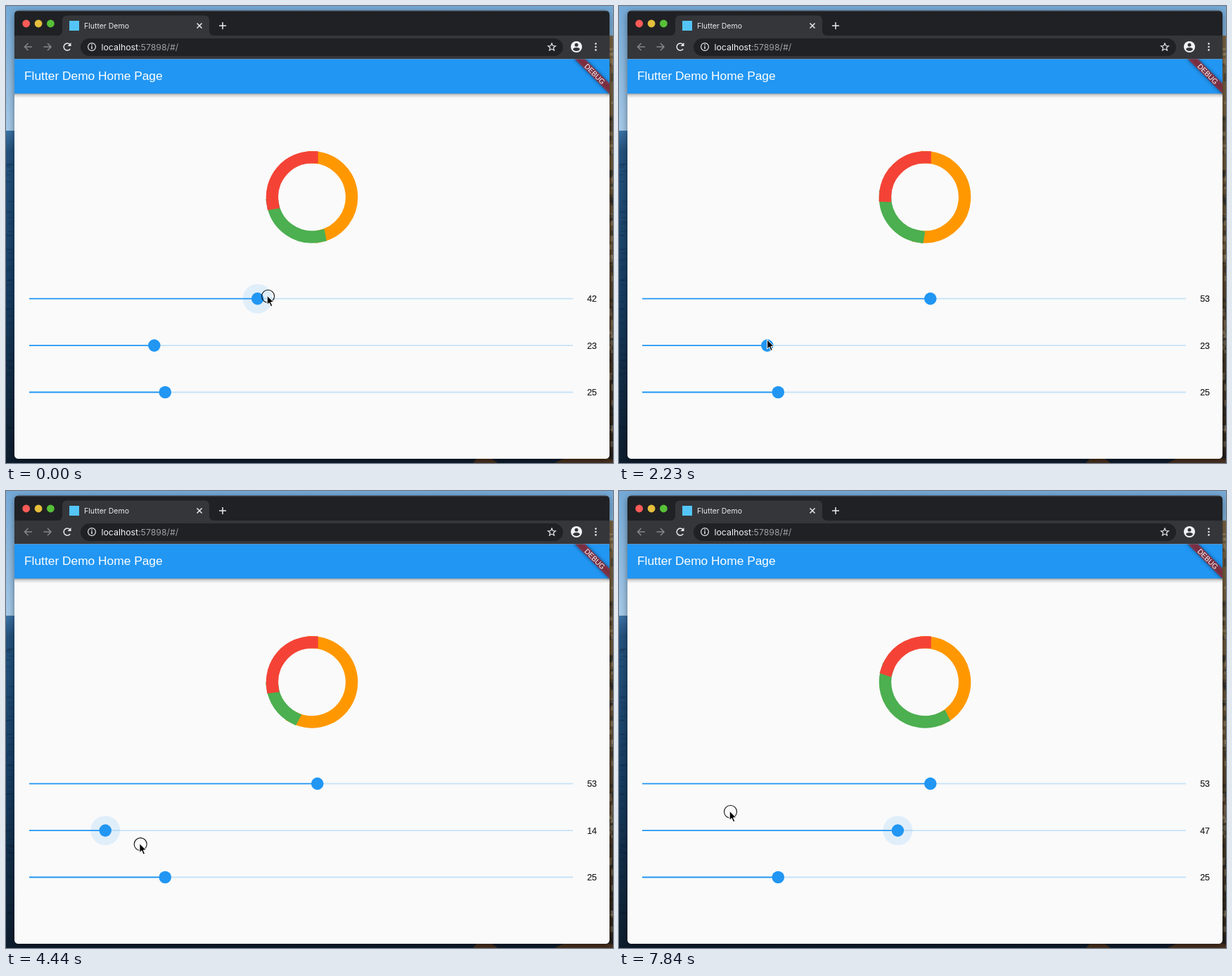
Recreate the animation shown at these times as an HTML page. Size 863 by 649 pixels, loop 7.99 s.

```html
<!DOCTYPE html>
<html lang="en">
<head>
<meta charset="utf-8">
<title>Flutter Demo</title>
<style>
  html, body { margin: 0; width: 100%; height: 100%; overflow: hidden; background: #10263c; }
  svg { display: block; width: 863px; height: 649px; }
  .ui { font-family: Inter, sans-serif; }
  .app { font-family: "Liberation Sans", Arial, sans-serif; }
  .line { fill: none; stroke: #e8eaed; stroke-width: 1.5; }
  .thin { stroke-width: 1.2; }
  .off { stroke: #85868a; }
  .ring path { fill: none; stroke-width: 17.4; stroke-linecap: square; }
  .track { stroke: #2196f3; stroke-width: 1.9; }
  .rest { stroke-opacity: .24; }
  .thumb { fill: #2196f3; }
  .halo { fill: #2196f3; fill-opacity: .12; }
  .value { font-size: 12.4px; text-anchor: end; fill: #1f1f1f; stroke: #1f1f1f; stroke-width: .2; }
</style>
</head>
<body>
<svg viewBox="0 0 863 649">
  <defs>
    <linearGradient id="sky" x2="0" y2="1">
      <stop offset="0" stop-color="#74a9d6"/><stop offset="1" stop-color="#a5c8e6"/>
    </linearGradient>
    <linearGradient id="sea" x2="0" y2="1">
      <stop offset="0" stop-color="#3b72a3"/><stop offset=".06" stop-color="#24527d"/>
      <stop offset=".5" stop-color="#173c60"/><stop offset="1" stop-color="#0d1d2d"/>
    </linearGradient>
    <linearGradient id="rock" x2="0" y2="1">
      <stop offset="0" stop-color="#7a6543"/><stop offset=".5" stop-color="#5d4a31"/>
      <stop offset="1" stop-color="#2a2119"/>
    </linearGradient>
    <linearGradient id="drop" x2="0" y2="1">
      <stop offset="0" stop-color="#000" stop-opacity=".38"/>
      <stop offset=".4" stop-color="#000" stop-opacity=".14"/>
      <stop offset="1" stop-color="#000" stop-opacity="0"/>
    </linearGradient>
    <filter id="soft" x="-20%" y="-100%" width="140%" height="300%"><feGaussianBlur stdDeviation="2.4"/></filter>
    <filter id="glow" x="-5%" y="-5%" width="110%" height="110%"><feGaussianBlur stdDeviation="5"/></filter>
    <clipPath id="frame"><rect x="12" y="6.5" width="846" height="636.5" rx="5.5"/></clipPath>
    <clipPath id="page"><rect x="12" y="75.5" width="846" height="567.5"/></clipPath>
  </defs>

  <!-- desktop -->
  <rect width="863" height="178" fill="url(#sky)"/>
  <rect y="177" width="863" height="472" fill="url(#sea)"/>
  <rect x="850" y="42" width="13" height="607" fill="url(#rock)"/>
  <path d="M664 649l5-6h22l8 6zM780 649l12-6h71v6z" fill="#48311f"/>
  <g id="grain"></g>
  <rect x="12" y="9" width="846" height="636" rx="6" opacity=".45" filter="url(#glow)"/>

  <g clip-path="url(#frame)">
    <!-- browser -->
    <rect x="12" y="6" width="846" height="37" fill="#202124"/>
    <rect x="12" y="6" width="846" height="1.5" fill="#fff" opacity=".2"/>
    <rect x="12" y="42" width="846" height="34" fill="#35363a"/>
    <path d="M73 42q7 0 7-7V20.500q0-7 7-7h195q7 0 7 7V35q0 7 7 7z" fill="#35363a"/>
    <circle cx="28.7" cy="25" r="5.4" fill="#fc5b57"/>
    <circle cx="46.1" cy="25" r="5.4" fill="#e5bf3c"/>
    <circle cx="63.4" cy="25" r="5.4" fill="#57c038"/>
    <rect x="90" y="21" width="14" height="14" fill="#54c5f8"/>
    <g class="ui">
      <text x="111" y="31.5" font-size="10.5" fill="#e8eaed">Flutter Demo</text>
      <rect x="106" y="46" width="686" height="25" rx="12.5" fill="#202124"/>
      <text x="135.5" y="62.5" font-size="12.3" fill="#9aa0a6"><tspan fill="#f1f3f4">localhost</tspan>:57898/#/</text>
    </g>
    <path class="line" d="M271.500 24.500l7 7m0-7l-7 7M303 28h10m-5-5v10"/>
    <path class="line off" d="M37 58H26.500m5-5l-5 5l5 5M53.500 58H64m-5-5l5 5l-5 5"/>
    <path class="line" d="M91.200 61a5 5 0 1 1-.6-6.600"/>
    <path d="M92.500 52v5h-5z" fill="#e8eaed"/>
    <circle class="line thin" cx="122" cy="58" r="5.4"/>
    <path class="line" d="M122 57v4M122 54.500v1.400"/>
    <path class="line thin" d="M776 53l1.500 3.500l3.900.3l-3 2.500l1 3.800l-3.400-2l-3.400 2l1-3.800l-3-2.500l3.900-.3z"/>
    <circle cx="811" cy="58" r="8" fill="#f1f3f4"/>
    <circle cx="811" cy="55.3" r="2.5" fill="#35363a"/>
    <path d="M806 61.800q0-2.900 5-2.900t5 2.900q-2 2.200-5 2.200t-5-2.200z" fill="#35363a"/>
    <path d="M838.500 53.600v9" stroke="#e8eaed" stroke-width="2.6" stroke-linecap="round" stroke-dasharray="0 4.4"/>

    <!-- page -->
    <rect x="12" y="75.5" width="846" height="568" fill="#fafafa"/>
    <rect x="12" y="124" width="846" height="7" fill="url(#drop)"/>
    <rect x="12" y="75.5" width="846" height="48.8" fill="#2196f3"/>
    <g class="app">
      <text x="26" y="105" font-size="17.35" fill="#fff">Flutter Demo Home Page</text>
      <g clip-path="url(#page)">
        <g transform="translate(858 75.5) rotate(45)">
          <rect x="-36" y="24.4" width="72" height="10.4" opacity=".5" filter="url(#soft)"/>
          <rect x="-36" y="24.4" width="72" height="10.4" fill="#b71c1c" fill-opacity=".63"/>
          <text y="33.2" font-size="10.2" text-anchor="middle" fill="#fff">DEBUG</text>
        </g>
      </g>
      <g class="ring" id="ring">
        <path stroke="#ff9800"/><path stroke="#4caf50"/><path stroke="#f44336"/>
      </g>
      <g id="sliders"></g>
    </g>
  </g>

  <g id="cursor">
    <circle id="press" r="9" fill="none" stroke="#111" stroke-width="1.1"/>
    <path d="M-1.300-1V12l3-2.800l2.300 5.200l2.300-1l-2.300-5h4.200z" fill="#000" stroke="#fff" stroke-linejoin="round"/>
  </g>
</svg>

<script>
const LOOP = 7990, STEP = 147.96;   // the screen refreshes once per step
const LAG = 0.84;                   // steps the thumb trails the pointer
const RELEASE = 13.5, PRESS = 17;   // first slider let go, second one grabbed
const LEFT = 33, RIGHT = 806;
const $ = id => document.getElementById(id);

function add(parent, markup) {
  const g = document.createElementNS("http://www.w3.org/2000/svg", "g");
  g.innerHTML = markup;
  parent.append(g);
  return [...g.children];
}

// Turning points of the hand: step, x, y.
const turns = [
  [-2, 347.6, 414], [10, 720, 388],
  [15, 212, 475], [18, 212, 475],
  [23.5, 474, 451], [29, 137, 505],
  [32.5, 425, 487], [34, 425, 487],
  [35.3, 828.5, 483.5], [38, 828.5, 483.5],
  [45, 562.5, 471.5],
  [49.3, 844, 470], [50.9, 844, 470],
  [53, 158.5, 455.5]
];

function hand(n) {
  const i = Math.max(1, turns.findIndex(p => p[0] >= n));
  const [t0, x0, y0] = turns[i - 1], [t1, x1, y1] = turns[i];
  const k = (1 - Math.cos(Math.PI * (n - t0) / (t1 - t0))) / 2;
  return [x0 + (x1 - x0) * k, y0 + (y1 - y0) * k];
}

function valueAt(n) {
  const v = 100 * (hand(n)[0] - LEFT) / (RIGHT - LEFT);
  return Math.round(Math.min(100, v));
}

function arc(from, to) {
  const R = 56.55;
  const point = a => (435 + R * Math.sin(a)).toFixed(2) + " " + (271.4 - R * Math.cos(a)).toFixed(2);
  return `M${point(from)}A${R} ${R} 0 ${+(to - from > Math.PI)} 1 ${point(to)}`;
}

const sliders = [415.6, 482.1, 548.5].map(y => add($("sliders"),
  `<line class="track rest" y1="${y}" y2="${y}"/>
   <line class="track" x1="${LEFT}" y1="${y}" y2="${y}"/>
   <circle class="halo" cy="${y}" r="20.9"/><circle class="thumb" cy="${y}" r="8.8"/>
   <text class="value" x="840" y="${y + 4.5}"></text>`));

function setSlider([rest, fill, halo, thumb, label], value, held) {
  const end = value > 99 ? RIGHT - 7 : RIGHT;   // a third digit narrows the track
  const x = LEFT + (end - LEFT) * value / 100;
  rest.setAttribute("x1", x);
  rest.setAttribute("x2", end);
  fill.setAttribute("x2", x);
  halo.setAttribute("cx", x);
  thumb.setAttribute("cx", x);
  halo.style.display = held ? "" : "none";
  label.textContent = value;
}

function draw(n) {
  const late = n - LAG;
  const values = [valueAt(Math.min(late, RELEASE - LAG)), valueAt(Math.max(late, PRESS)), 25];
  const held = n < RELEASE ? 0 : n >= PRESS ? 1 : -1;
  sliders.forEach((s, i) => setSlider(s, values[i], i === held));

  const turn = 2 * Math.PI / values.reduce((a, b) => a + b);
  let from = 0;
  values.forEach((v, i) => {
    const sweep = v * turn;
    $("ring").children[i].setAttribute("d", arc(from + sweep * 0.012, from + sweep));
    from += sweep;
  });

  const [x, y] = hand(n);
  $("cursor").setAttribute("transform", `translate(${x} ${y})`);
  $("press").style.display = held < 0 ? "none" : "";
}

// Ripples on the sea and patches on the rocks beside the window.
let seed = 7;
const random = () => (seed = seed * 16807 % 2147483647) / 2147483647;
for (let i = 0; i < 70; i++) {
  const y = 60 + random() * 580, shade = random() < .6 ? "#0a1420" : "#c9b48c";
  add($("grain"), `<rect x="${856 + random() * 5}" y="${y}" width="5" height="${3 + random() * 9}" fill="${shade}" opacity=".3"/>
    <rect x="${random() * 6 - 2}" y="${182 + y * .7}" width="8" height="1" fill="#0a1c30" opacity=".3"/>`);
}

let shown = -1;
function tick() {
  const t = performance.now() % LOOP;
  const n = Math.min(53, Math.floor((t + 7) / STEP));
  if (n !== shown) draw(shown = n);
  requestAnimationFrame(tick);
}
tick();
</script>
</body>
</html>
```
